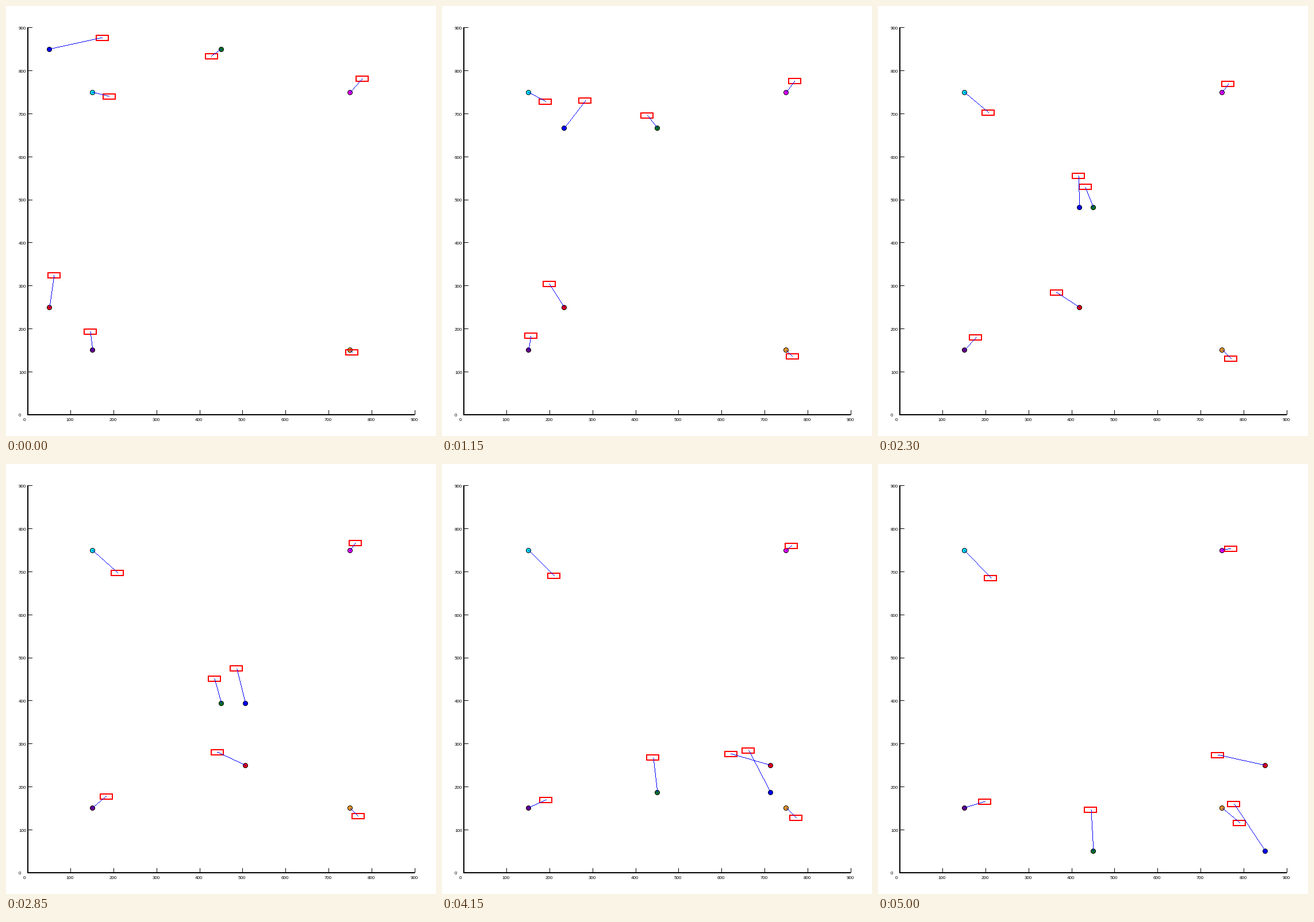
A matplotlib script for the animation above (5050 ms loop, 748 by 748 pixels).

```python
import numpy as np
import matplotlib.pyplot as plt
from matplotlib.animation import FuncAnimation
from matplotlib.patches import Circle, Rectangle

SIZE, DPI = 748, 68
PX = 72 / DPI              # one pixel in points
MARGIN, SCALE = 37.4, 0.748
FRAMES, INTERVAL = 101, 50
STEP = 8                   # units a moving dot travels per frame
BOX_W, BOX_H = 21, 9

plt.rcParams["font.family"] = "Liberation Sans"
fig = plt.figure(figsize=(SIZE / DPI, SIZE / DPI), dpi=DPI, facecolor="white")
ax = fig.add_axes([0, 0, 1, 1])
ax.set_xlim(0, SIZE)
ax.set_ylim(SIZE, 0)
ax.axis("off")


def to_px(x, y):
    return np.array([MARGIN + SCALE * x, SIZE - MARGIN - SCALE * y])


def pixel(v):
    return np.floor(v + 0.5) + 0.5


def stroke(xs, ys, width):
    ax.plot(xs, ys, color="black", lw=width * PX, solid_capstyle="butt",
            snap=False, zorder=1)


def draw_axes():
    stroke([38, 38], [37, 712], 2)
    stroke([37, 711], [711, 711], 2)
    style = dict(fontsize=8 * PX, ha="left", va="baseline", color="black")
    for v in range(0, 901, 100):
        x, y = to_px(v, v)
        if v:
            stroke([pixel(x)] * 2, [703, 711], 1)
            stroke([38, 46], [pixel(y)] * 2, 1)
        ax.text(x - 7.4, 722, str(v), **style)
        ax.text(22, y + 3.7, str(v), **style)


def glide(t, beats, poses):
    """Smooth path through a few poses, one per beat."""
    slopes = np.gradient(poses, beats, axis=0)
    k = min(np.searchsorted(beats, t, side="right") - 1, len(beats) - 2)
    h = beats[k + 1] - beats[k]
    u = (t - beats[k]) / h
    return ((1 + 2 * u) * (1 - u) ** 2 * poses[k]
            + u * (1 - u) ** 2 * h * slopes[k]
            + u * u * (3 - 2 * u) * poses[k + 1]
            + u * u * (u - 1) * h * slopes[k + 1])


def pixel_line(a, b):
    """Points of a one-pixel line without smoothing."""
    n = int(max(abs(b - a))) + 1
    return np.linspace(a, b, n).T


SETTLE = (0, 11, 36, 100)      # quick start, then a slow drift
LATE_PUSH = (0, 36, 83, 100)   # calm until a neighbour comes close


class Marker:
    """A dot, its label box and the leader between them."""

    def __init__(self, color, start, heading, offsets, beats=SETTLE):
        self.start = np.array(start)
        self.heading = np.array(heading)
        self.offsets = np.array(offsets, float)
        self.beats = beats
        self.dot = ax.add_patch(Circle((0, 0), 4, fc=color, ec="black",
                                       lw=PX, zorder=3))
        self.box = ax.add_patch(Rectangle((0, 0), BOX_W, BOX_H, fill=False,
                                          ec="#ff0000", lw=2 * PX,
                                          snap=False, zorder=4))
        self.leader, = ax.plot([], [], ",", color="#0000ff", zorder=5)

    def place(self, i):
        dot = to_px(*(self.start + STEP * i * self.heading))
        label = dot + glide(i, self.beats, self.offsets)
        corner = np.floor(label - (BOX_W / 2, BOX_H / 2 - 0.4))
        self.dot.center = pixel(dot)
        self.box.set_xy(corner)
        self.leader.set_data(*pixel_line(pixel(dot), pixel(label - 0.5)))


draw_axes()
STILL = (0, 0)
markers = [
    Marker("#0000ff", (50, 850), (1, -1),
           [(93, -19), (63, -40), (14, -50), (-54, -82)]),
    Marker("#f00010", (50, 250), (1, 0),
           [(9, -55), (-14, -49), (-32, -30), (-82, -17.5)]),
    Marker("#007820", (450, 850), (0, -1),
           [(-16.5, 13), (-17.5, -10), (-14.5, -28), (-4, -72)]),
    Marker("#00e5ff", (150, 750), STILL,
           [(30, 8), (26, 8), (39.5, 30), (46.5, 48.5)]),
    Marker("#ea00ff", (750, 750), STILL,
           [(21.5, -23.5), (12.5, -16), (10, -7), (15.5, -2)], LATE_PUSH),
    Marker("#6a0088", (150, 150), STILL,
           [(-3, -31.5), (-2.5, -26.5), (15.5, -23.5), (36.5, -10.5)]),
    Marker("#f59e1b", (750, 150), STILL,
           [(4, 4), (15, 14.5), (18, 17), (31, 26.5)], LATE_PUSH),
]


def update(i):
    for m in markers:
        m.place(i)
    return []


anim = FuncAnimation(fig, update, frames=FRAMES, interval=INTERVAL,
                     init_func=lambda: update(0), repeat=True, repeat_delay=0)
plt.show()
```
